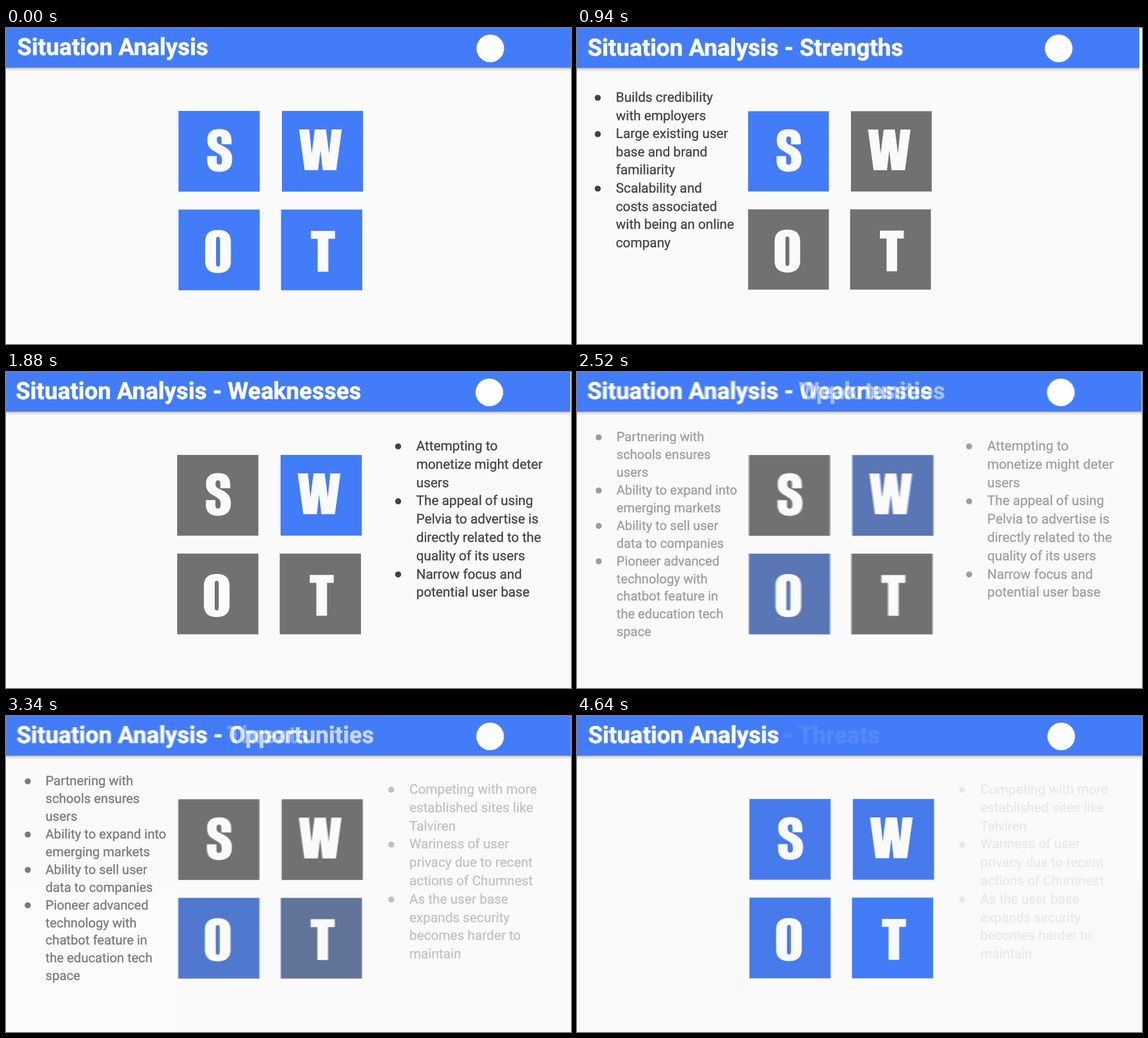
Recreate the animation shown at these times as an HTML page. Size 858x480 px, loop 4700 ms.

```html
<!DOCTYPE html>
<html lang="en">
<head>
<meta charset="utf-8">
<title>Situation Analysis</title>
<style>
  html, body { margin: 0; width: 100%; height: 100%; overflow: hidden; background: #fafafa; }
  svg { display: block; font-family: Roboto, sans-serif; text-rendering: geometricPrecision; }
  .title { font-size: 35.85px; font-weight: 700; fill: #fff; stroke: #fff; stroke-width: .6px; }
  .list { fill: #424242; stroke: #424242; stroke-width: .3px; }
</style>
</head>
<body>
<svg id="stage" width="858" height="480" viewBox="0 0 858 480">
  <defs>
    <linearGradient id="shadow" x2="0" y2="1">
      <stop stop-opacity=".36"/>
      <stop offset=".3" stop-opacity=".13"/>
      <stop offset="1" stop-opacity="0"/>
    </linearGradient>
  </defs>
</svg>
<script>
const BLUE = '#437cf9', GRAY = '#717171', PAPER = '#fafafa';
const HOLD = 400, STEP = 60, SLIDE = 940;

// Each tile: offset from the first tile, and its heavy condensed letter.
const tiles = [
  { name: 'S', x: 0, y: 0, d: 'M80.5 50.5H65.5V43.5C65.5 40 64.5 38.5 62 38.5S58.2 40.3 58.2 43.5C58.2 48.5 60 50 66 52.5C77 58 81.5 62.5 81.5 73.5C81.5 86.5 74 92.5 62 92.5C50 92.5 43.5 86.5 43.5 75.5V68.5H58V76.5C58 80.3 59.3 81.5 62 81.5S66 79.8 66 76C66 68.5 64.5 67 57.5 63C47 57 43.8 54 43.8 44C43.8 33 50 27.5 62 27.5S80.5 33 80.5 45Z' },
  { name: 'W', x: 157, y: 0, d: 'M26 28H41.5L45.3 65L50 28H67L71.7 65L75.5 28H91L82.5 90H62L58.5 60L55 90H34.5Z' },
  { name: 'O', x: 0, y: 149.8, d: 'M40.5 49C40.5 36 48 31 60 31S79.5 36 79.5 49V79C79.5 91 72 96.5 60 96.5S40.5 91 40.5 79ZM57 46V82C57 85 57.7 86.5 60 86.5S63 85 63 82V46C63 42.5 62.3 41.5 60 41.5S57 42.5 57 46Z' },
  { name: 'T', x: 155.7, y: 149.8, d: 'M45.5 32.5H82V44.5H71.8V94.5H55.6V44.5H45.5Z' }
];

// tile: top left of the tile grid; text: first baseline of the list.
const slides = [
  { title: [17, 41], tile: [262, 126], logo: 735.5, edge: 858 },
  { topic: 'Strengths', title: [16, 42], tile: [259.8, 126.4], scale: .995, logo: 731.5, edge: 854, header: 60.6,
    text: [59, 112], size: 20.3, pitch: 27.6, bullet: 31.5,
    items: ['Builds credibility|with employers', 'Large existing user|base and brand|familiarity',
      'Scalability and|costs associated|with being an online|company'] },
  { topic: 'Weaknesses', title: [14.8, 41], tile: [260, 126], logo: 734, edge: 857,
    text: [623, 119], size: 20.3, pitch: 27.8, bullet: 595.5,
    items: ['Attempting to|monetize might deter|users',
      'The appeal of using|Pelvia to advertise is|directly related to the|quality of its users',
      'Narrow focus and|potential user base'] },
  { topic: 'Opportunities', title: [16.6, 41], tile: [262, 126.3], logo: 735.5, edge: 858,
    text: [60, 105.3], size: 19.7, pitch: 26.9, bullet: 33,
    items: ['Partnering with|schools ensures|users', 'Ability to expand into|emerging markets',
      'Ability to sell user|data to companies',
      'Pioneer advanced|technology with|chatbot feature in|the education tech|space'] },
  { topic: 'Threats', title: [14.8, 41], tile: [260.5, 126.8], logo: 734.5, edge: 857.5,
    text: [612.5, 118], size: 20.3, pitch: 27.8, bullet: 585,
    items: ['Competing with more|established sites like|Talviren',
      'Wariness of user|privacy due to recent|actions of Chumnest',
      'As the user base|expands security|becomes harder to|maintain'] }
];

const rect = (x, y, w, h, fill) => `<rect x="${x}" y="${y}" width="${w}" height="${h}" fill="${fill}"/>`;
const dot = (x, y, r, fill) => `<circle cx="${x}" cy="${y}" r="${r}" fill="${fill}"/>`;

function listMarkup({ text: [x, y], size, pitch, bullet, items }) {
  let out = '', row = 0;
  for (const item of items) {
    out += dot(bullet, y + row * pitch - 6, 4.6, '#424242');
    for (const line of item.split('|')) {
      out += `<text class="list" x="${x}" y="${y + row++ * pitch}" font-size="${size}">${line}</text>`;
    }
  }
  return out;
}

function slideMarkup(slide, index) {
  const { topic, title, tile, scale = 1, logo, edge, header = 60 } = slide;
  const grid = tiles.map((t, i) => {
    const fill = !index || i === index - 1 ? BLUE : GRAY;
    return `<g transform="translate(${t.x} ${t.y})" aria-label="${t.name}">${rect(0, 0, 123.3, 122.6, fill)}
      <path d="${t.d}" fill="${PAPER}" fill-rule="evenodd"/></g>`;
  }).join('');
  return rect(0, 0, 858, 480, PAPER)
    + rect(0, header, edge, 6, 'url(#shadow)')
    + rect(0, 0, edge, header, BLUE)
    + (edge < 858 ? rect(edge, 0, 4, 480, '#fdfdfd') + rect(edge - .5, header, 1, 480, '#e2e6ee') : '')
    + `<text class="title" x="${title[0]}" y="${title[1]}">Situation Analysis${topic ? ' - ' + topic : ''}</text>`
    + dot(logo, 31, 21, '#fff')
    + `<g transform="translate(${tile}) scale(${scale})">${grid}</g>`
    + (topic ? listMarkup(slide) : '');
}

const stage = document.getElementById('stage');
const layers = slides.map((slide, i) => {
  const layer = document.createElementNS('http://www.w3.org/2000/svg', 'g');
  layer.innerHTML = slideMarkup(slide, i);
  return stage.appendChild(layer);
});

let current = -1;
function draw() {
  const time = performance.now() % (SLIDE * slides.length);
  const index = Math.floor(time / SLIDE);
  const fade = Math.max(0, Math.floor((time % SLIDE - HOLD) / STEP) + 1) / 10;
  const next = layers[(index + 1) % layers.length];
  if (index !== current) {
    current = index;
    layers.forEach(layer => layer.style.display = 'none');
    layers[index].style.display = next.style.display = '';
    layers[index].style.opacity = 1;
    stage.append(layers[index], next);
  }
  next.style.opacity = fade;
  requestAnimationFrame(draw);
}
draw();
</script>
</body>
</html>
```
